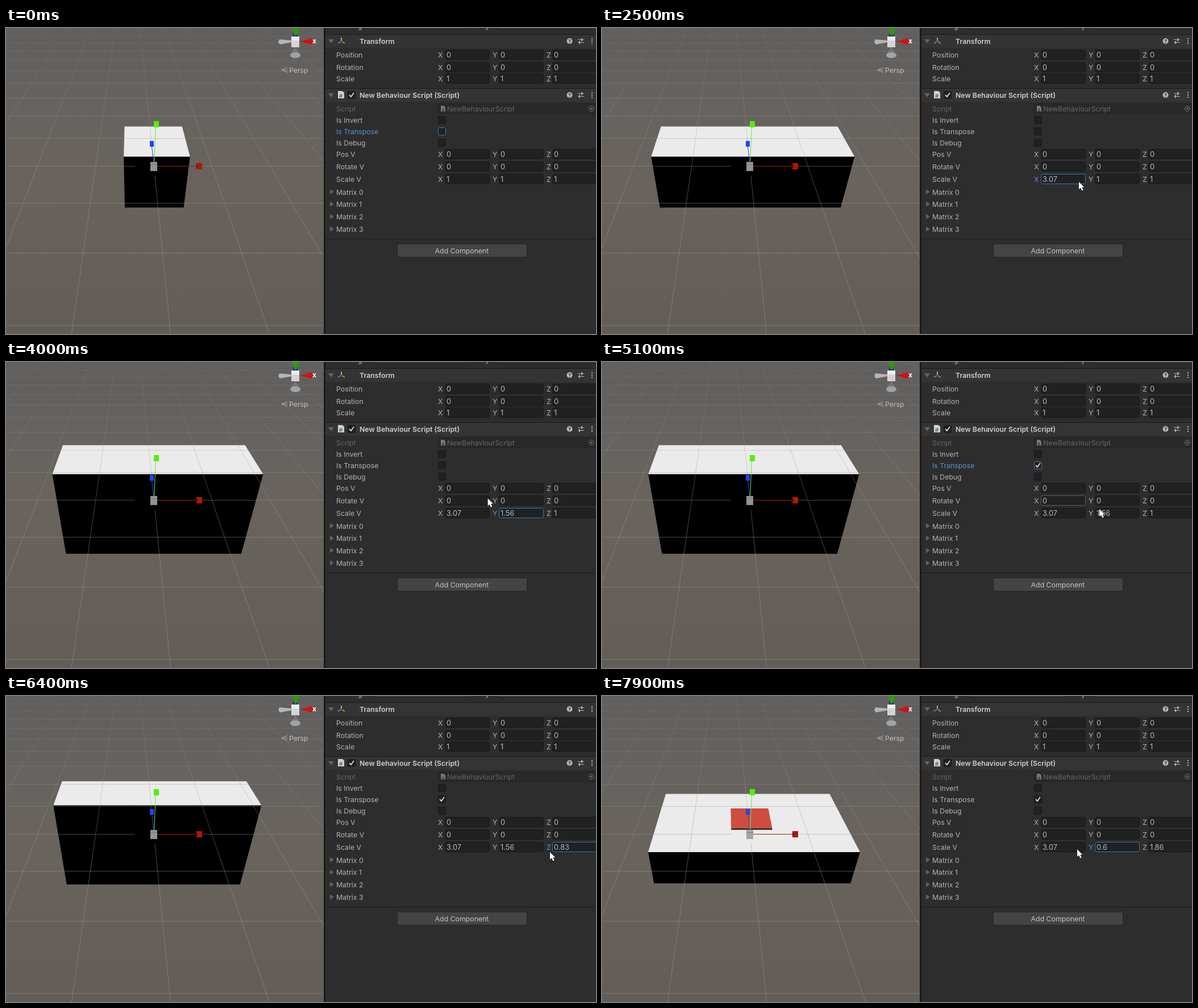
Animation of 1038 by 539 pixels, one loop 8000 ms. Source, as an HTML page with a canvas:

```html
<!DOCTYPE html>
<html lang="en">
<head>
<meta charset="utf-8">
<title>Scale matrix in the inspector</title>
<style>
html, body { margin: 0; width: 100%; height: 100%; overflow: hidden; background: #2d2d2d; }
canvas { display: block; }
</style>
</head>
<body>
<canvas id="stage" width="1038" height="539"></canvas>
<script>
const c = document.getElementById('stage').getContext('2d');
const LOOP = 8000, STEP = 100;
const BLUE = '#5a8fd8', TEXT = '#b2b2b2', DIM = '#666';

// Keys are [step, value, ...]; steps last 100 ms.
const cursorKeys = [[2, 647, 387], [5, 705, 320], [9, 764, 259], [15, 764, 260], [16, 781, 262],
  [20, 882, 268], [24, 842, 271], [25, 839, 271], [28, 860, 264], [29, 861, 263], [33, 914, 262],
  [34, 922, 263], [35, 920, 263], [39, 884, 264], [42, 775, 193], [44, 767, 183], [48, 767, 183],
  [51, 875, 259], [53, 928, 299], [56, 961, 263], [57, 961, 263], [61, 1011, 270], [64, 957, 275],
  [68, 990, 272], [72, 865, 264], [74, 873, 264], [75, 866, 265], [79, 836, 270]];
const scaleKeys = [
  [[15, 1], [16, 1.15], [20, 4.43], [24, 3.13], [25, 3.07]],
  [[29, 1], [33, 2.58], [34, 2.79], [35, 2.74], [39, 1.56], [72, 1.56], [74, 1.82], [75, 1.58], [79, .6]],
  [[57, 1], [61, 2.51], [64, .83], [68, 1.86]]
];
const focusKeys = [[0, 'T'], [12, 0], [29, 1], [46, 'T'], [58, 2], [72, 1]];

function at(keys, n) {
  if (n <= keys[0][0]) return keys[0].slice(1);
  const i = keys.findIndex(k => k[0] >= n);
  if (i < 0) return keys[keys.length - 1].slice(1);
  const a = keys[i - 1], b = keys[i], u = (n - a[0]) / (b[0] - a[0]);
  return a.slice(1).map((v, j) => v + (b[j + 1] - v) * u);
}

function rect(x, y, w, h, fill) {
  c.fillStyle = fill;
  c.fillRect(x, y, w, h);
}

function poly(points, fill, stroke) {
  c.beginPath();
  points.forEach(p => c.lineTo(p[0], p[1]));
  c.closePath();
  if (stroke) { c.strokeStyle = stroke; c.stroke(); }
  c.fillStyle = fill;
  c.fill();
}

function line(x1, y1, x2, y2, stroke, width = 1) {
  c.strokeStyle = stroke;
  c.lineWidth = width;
  c.beginPath();
  c.moveTo(x1, y1);
  c.lineTo(x2, y2);
  c.stroke();
  c.lineWidth = 1;
}

function rounded(x, y, w, h, fill, stroke, r = 3) {
  c.beginPath();
  c.roundRect(x + .5, y + .5, w - 1, h - 1, r);
  c.fillStyle = fill;
  c.fill();
  c.strokeStyle = stroke;
  c.stroke();
}

function text(str, x, y, fill = TEXT, size = 12.3, weight = 400) {
  c.font = `${weight} ${size}px Inter, sans-serif`;
  c.fillStyle = fill;
  c.fillText(str, x, y + 4.5);
}

// World space to the perspective view
function project(x, y, z) {
  const w = 1 + .133 * z - .1103 * y;
  return [(260 + 102.4 * x - 24.7 * y + 29 * z) / w, (244 - 113.5 * y - 23.6 * z) / w];
}

function box(x, top, bottom, z, topFill) {
  const a = project(-x, top, -z), b = project(x, top, -z);
  poly([a, b, project(x, bottom, -z), project(-x, bottom, -z)], '#000');
  poly([a, b, project(x, top, z), project(-x, top, z)], topFill);
}

function grid() {
  const fade = c.createLinearGradient(0, 0, 0, 300);
  fade.addColorStop(0, 'rgba(150,150,150,.14)');
  fade.addColorStop(.5, 'rgba(150,150,150,.34)');
  fade.addColorStop(1, 'rgba(150,150,150,.5)');
  const draw = (p, q) => line(...p, ...q, fade);
  for (let i = -9; i <= 11; i++) {
    if (i > -4 && i) draw(project(-9, 0, i), project(9, 0, i));
    if (i) draw(project(i, 0, -4), project(i, 0, 13));
  }
  // The centre lines leave room for the handles.
  draw([0, 243.5], [227, 243.5]);
  draw([345, 243.5], [560, 243.5]);
  draw(project(0, 0, 13), [256, 199]);
  draw([262, 260], project(0, 0, -4));
}

function handles() {
  line(266, 243.5, 336, 243.5, '#a01d10');
  line(260.5, 237, 263.5, 175, '#67e83a');
  line(260, 237, 256.5, 209, '#2a48d8');
  rect(335, 238, 10, 11, '#b31509');
  rect(335, 241, 2, 5, '#640b05');
  rect(260, 164, 9, 11, '#55f000');
  rect(253, 199, 7, 10, '#2344fa');
  rect(254, 236, 12, 16, 'rgba(160,160,160,.92)');
  rect(254, 240, 12, 1, '#777');
}

function orientation() {
  rect(505, 9, 8, 6, '#16309c');
  poly([[503, 0], [516, 0], [512, 12], [508, 14]], '#2f9a0c');
  poly([[481, 20], [479, 25], [482, 29], [503, 25], [503, 22]], '#b5b5b5');
  poly([[517, 24], [538, 18], [541, 23], [538, 29]], '#d51010');
  poly([[509, 34], [518, 47], [514, 53], [505, 53], [500, 47]], '#777');
  c.beginPath();
  c.ellipse(509, 48, 9, 5, 0, 0, 7);
  c.fillStyle = '#a3a3a3';
  c.fill();
  rect(502, 15, 14, 19, '#d4d4d4');
  rect(502, 15, 14, 7, '#ededed');
  text('x', 539, 22, '#fff', 12, 700);
  [-4, 0, 4].forEach(d => line(485, 74 + d / 8, 495, 74 + d, '#aaa'));
  text('Persp', 498, 74, '#bdbdbd');
}

function scene(s) {
  c.save();
  c.beginPath();
  c.rect(0, 0, 560, 539);
  c.clip();
  const sky = c.createLinearGradient(0, 0, 0, 539);
  [[0, '#605f5e'], [.25, '#666360'], [.5, '#69635d'], [1, '#635d58']].forEach(k => sky.addColorStop(...k));
  rect(0, 0, 560, 539, sky);
  const [x, y, z] = s.map(v => v / 2);
  box(x, y, -y, z, '#ebebeb');
  if (y < .325) box(.325, .325, Math.max(y, .3), .325, '#cf4c40');
  grid();
  handles();
  orientation();
  c.restore();
}

function checkmark(x, y) {
  c.lineJoin = 'miter';
  c.strokeStyle = '#d8d8d8';
  c.lineWidth = 1.8;
  c.beginPath();
  c.moveTo(x - 4, y);
  c.lineTo(x - 1, y + 3);
  c.lineTo(x + 4, y - 4);
  c.stroke();
  c.lineWidth = 1;
}

function toggle(x, y, checked, border = '#181818') {
  rounded(x - 7, y - 7, 14, 14, '#212121', border, 2);
  if (checked) checkmark(x, y);
}

function header(y, title) {
  rect(562, y - 12, 476, 1, '#1a1a1a');
  rect(562, y - 11, 476, 23, '#343434');
  poly([[567, y - 3], [577, y - 3], [572, y + 4]], '#646464');
  text(title, 622, y, '#cecece', 12.3, 600);
  c.beginPath();
  c.arc(991.5, y, 5, 0, 7);
  c.fillStyle = '#b8b8b8';
  c.fill();
  text('?', 989, y - .5, '#333', 9, 700);
  line(1006, y - 2.5, 1017, y - 2.5, '#b0b0b0');
  line(1006, y + 2.5, 1017, y + 2.5, '#b0b0b0');
  rect(1012, y - 5, 2, 5, '#b0b0b0');
  rect(1008, y, 2, 5, '#b0b0b0');
  [-5, -1, 3].forEach(d => rect(1030, y + d, 2, 2, '#b8b8b8'));
}

function vector(label, y, values, focus, hover) {
  text(label, 581, y);
  values.forEach((v, i) => {
    const x = [772, 867, 961][i];
    text('XYZ'[i], [760, 856, 951][i], y, i === focus ? BLUE : TEXT);
    rounded(x, y - 9, 79, 18, '#212121', i === focus ? '#3b74b6' : i === hover ? '#5c5c5c' : '#181818');
    text(String(+v.toFixed(2)), x + 3, y, '#b8b8b8', 12.8);
  });
}

function page(x, y, w, h, fill) {
  poly([[x, y], [x + w - 3, y], [x + w, y + 3], [x + w, y + h], [x, y + h]], fill);
}

function inspector(n, s, focus) {
  rect(560, 0, 478, 539, '#2d2d2d');
  rect(559, 0, 3, 539, '#1b1b1b');
  rounded(645, -14, 169, 17, '#393939', '#1c1c1c');
  rounded(866, -14, 180, 17, '#393939', '#1c1c1c');
  text('g', 619, -4);
  text('y', 843, -4);

  header(23, 'Transform');
  line(590, 23, 590, 17, '#8dc63f', 2);
  line(589, 24, 584, 27, '#3d8fe0', 2);
  line(591, 24, 596, 27, '#e2743d', 2);
  vector('Position', 47, [0, 0, 0]);
  vector('Rotation', 69, [0, 0, 0]);
  vector('Scale', 89, [1, 1, 1]);

  header(118, 'New Behaviour Script (Script)');
  page(584, 111, 11, 13, '#d0d0d0');
  text('#', 586, 118, '#3c8440', 9.5, 700);
  toggle(608, 118, true);
  text('Script', 581, 142, DIM);
  rounded(760, 133, 290, 18, '#292929', '#222');
  page(765, 137, 8, 10, '#777');
  text('#', 767, 142, '#333', 6, 700);
  text('NewBehaviourScript', 776, 142, DIM);
  c.strokeStyle = c.fillStyle = '#777';
  c.beginPath();
  c.arc(1030, 142, 4.5, 0, 7);
  c.stroke();
  c.fillRect(1028.5, 140.5, 3, 3);

  const active = focus === 'T';
  text('Is Invert', 581, 162);
  toggle(767, 162);
  text('Is Transpose', 581, 182, active ? BLUE : TEXT);
  toggle(767, 182, n >= 47, active ? '#3b74b6' : n >= 44 && n < 46 ? '#5c5c5c' : '#181818');
  text('Is Debug', 581, 202);
  toggle(767, 202);
  vector('Pos V', 222, [0, 0, 0]);
  vector('Rotate V', 244, [0, 0, 0], -1, n === 51 ? 0 : -1);
  vector('Scale V', 266, s, focus);
  for (let i = 0; i < 4; i++) {
    const y = 289 + i * 21.8;
    poly([[570, y - 5], [577, y - .5], [570, y + 4]], '#606060');
    text('Matrix ' + i, 581, y);
  }
  rect(562, 371, 476, 1, '#191919');
  rounded(688, 380, 229, 24, '#444', '#262626');
  c.textAlign = 'center';
  text('Add Component', 802, 392, '#c4c4c4');
  c.textAlign = 'left';
}

function pointer(x, y) {
  c.save();
  c.translate(x, y);
  poly([[0, 0], [0, 13], [3, 10.4], [5.4, 15.5], [7.7, 14.4], [5.4, 9.5], [9.4, 9.4]], '#fff', '#111');
  c.restore();
}

function frame(now) {
  const n = Math.floor(now % LOOP / STEP);
  const s = scaleKeys.map(k => at(k, n)[0]);
  const focus = focusKeys.filter(k => k[0] <= n).pop()[1];
  scene(s);
  inspector(n, s, focus);
  if (n >= 2) pointer(...at(cursorKeys, n));
  requestAnimationFrame(frame);
}
requestAnimationFrame(frame);
</script>
</body>
</html>
```
